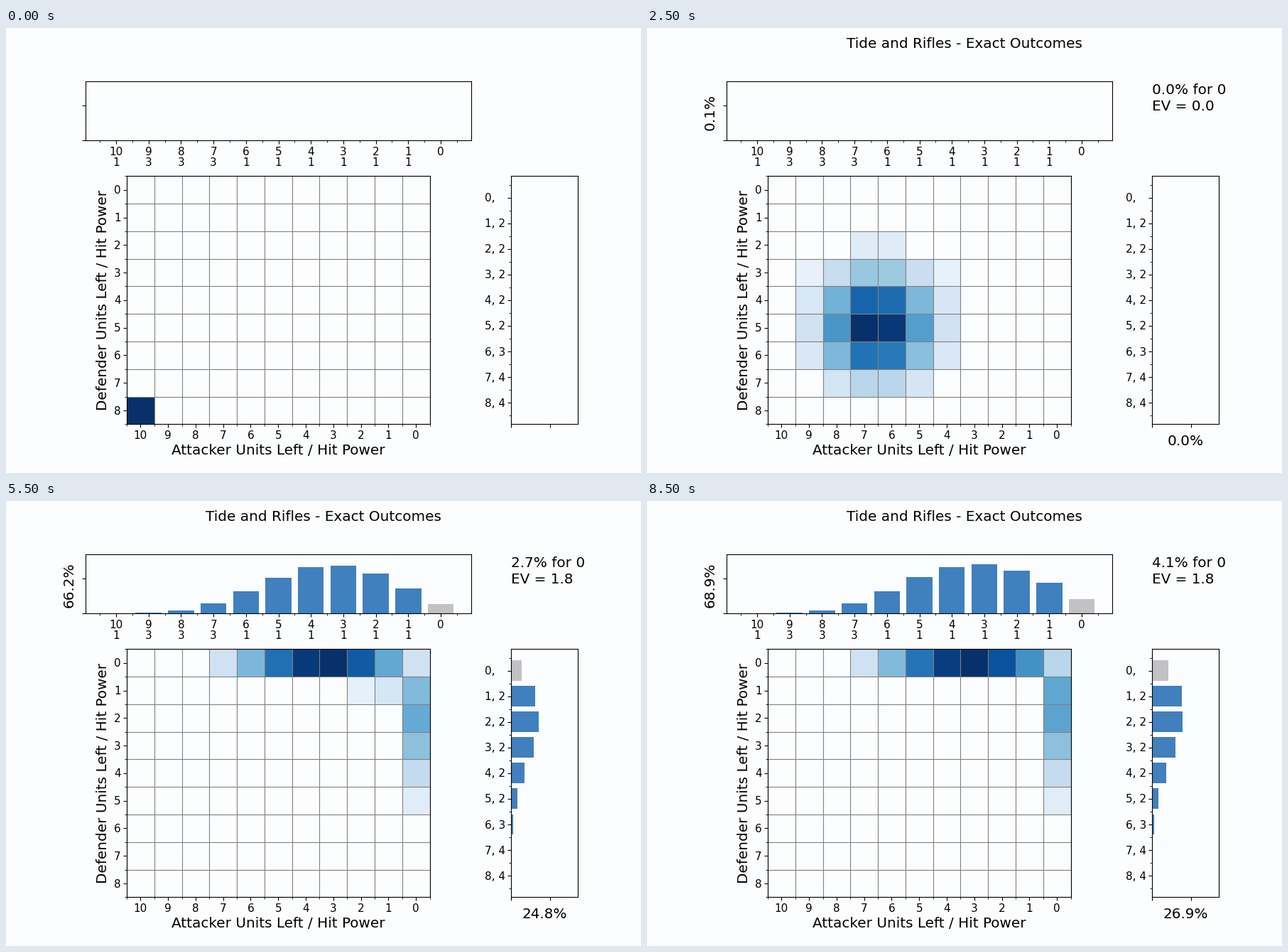
These frames come from a looping animation (894 px wide and 626 px high, 9500 ms). A matplotlib script:

```python
import numpy as np
import matplotlib.pyplot as plt
from matplotlib.animation import FuncAnimation

W, H, DPI = 894, 626, 100
PAPER, BLUE, SILVER = "#fcfdfe", "#4080be", "#c2c2c4"
SMALL, BIG = 11, 14.4
LIMIT = 0.17          # top of both bar scales
FAINT = 0.075         # cells below this share of the peak stay blank

# Hit power (out of 6) of each unit; the weakest units fall first.
ATTACK = [4, 3, 3, 3, 1, 1, 1, 1, 1, 1]
DEFEND = [4, 4, 3, 2, 2, 2, 2, 2]
NA, ND = len(ATTACK), len(DEFEND)
ROUNDS = 7

plt.rcParams["font.family"] = "DejaVu Sans"


def hit_odds(powers):
    odds = np.ones(1)
    for p in powers:
        odds = np.convolve(odds, [1 - p / 6, p / 6])
    return odds


def fight(state):
    """One round of simultaneous fire; state[a, d] holds probabilities."""
    after = np.zeros_like(state)
    after[0], after[:, 0] = state[0], state[:, 0]
    for a in range(1, NA + 1):
        for d in range(1, ND + 1):
            for i, p in enumerate(hit_odds(ATTACK[:a])):
                for j, q in enumerate(hit_odds(DEFEND[:d])):
                    after[max(a - j, 0), max(d - i, 0)] += state[a, d] * p * q
    return after


start = np.zeros((NA + 1, ND + 1))
start[NA, ND] = 1
states = [start]
for _ in range(ROUNDS):
    states.append(fight(states[-1]))

fig = plt.figure(figsize=(W / DPI, H / DPI), dpi=DPI, facecolor=PAPER)


def panel(left, top, right, bottom):
    ax = fig.add_axes([left / W, 1 - bottom / H,
                       (right - left) / W, (bottom - top) / H])
    ax.set_facecolor(PAPER)
    return ax


def write(x, y, s="", size=BIG, ha="center", turn=0):
    """Text with its baseline at pixel (x, y) counted from the top left."""
    return fig.text(x / W, 1 - y / H, s, size=size, ha=ha, va="baseline",
                    rotation=turn, rotation_mode="anchor")


def set_ticks(axis, count):
    axis.set_ticks(range(count), labels=[""] * count)
    axis.set_ticks(np.arange(count + 1) - 0.5, minor=True)


# Heat map of all outcomes
L, T, R, B = 170, 208.4, 596.5, 557.3
grid = panel(L, T, R, B)
mesh = grid.pcolormesh(np.arange(NA + 2) - 0.5, np.arange(ND + 2) - 0.5,
                       np.zeros((ND + 1, NA + 1)), cmap="Blues", vmin=0, vmax=1)
set_ticks(grid.xaxis, NA + 1)
set_ticks(grid.yaxis, ND + 1)
grid.grid(which="minor", color="gray", lw=0.8)
grid.set_xlim(-0.5, NA + 0.5)
grid.set_ylim(ND + 0.5, -0.5)
cell_w, cell_h = (R - L) / (NA + 1), (B - T) / (ND + 1)
for k in range(NA + 1):
    write(L + (k + 0.5) * cell_w, 578, str(NA - k), SMALL)
for k in range(ND + 1):
    write(161.5, T + (k + 0.5) * cell_h + 5.6, str(k), SMALL, "right")
write(383.5, 600, "Attacker Units Left / Hit Power")
write(142, 383, "Defender Units Left / Hit Power", turn=90)

# Attacker bars
top = panel(112, 75, 655, 158)
a_bars = top.bar(range(NA + 1), np.zeros(NA + 1), color=[BLUE] * NA + [SILVER])
set_ticks(top.xaxis, NA + 1)
top.set_yticks([0, 0.1], labels=["", ""])
top.set_xlim(-0.94, NA + 0.94)
top.set_ylim(0, LIMIT)
step = (655 - 112) / (NA + 1.88)
for k in range(NA + 1):
    x, n = 112 + (k + 0.94) * step, NA - k
    write(x, 179, str(n), SMALL)
    if n:
        write(x, 194, str(ATTACK[n - 1 - NA] if n == NA else ATTACK[NA - 1 - k + 0] if False else sorted(ATTACK)[n - 1]), SMALL)

# Defender bars
side = panel(711, T, 805, B)
d_bars = side.barh(range(ND + 1), np.zeros(ND + 1), color=[SILVER] + [BLUE] * ND)
set_ticks(side.yaxis, ND + 1)
side.set_xticks([0, 0.1], labels=["", ""])
side.set_ylim(ND + 0.84, -0.84)
side.set_xlim(0, LIMIT)
step = (B - T) / (ND + 1.68)
for k in range(ND + 1):
    power = sorted(DEFEND)[k - 1] if k else ""
    write(673.5, T + (k + 0.84) * step + 5.6, f"{k}, {power}", SMALL, "left")

title = write(446.5, 28)
a_label = write(95, 118, turn=90)
d_label = write(758, 587)
tie_label = write(711, 93, ha="left")
ev_label = write(711, 116, ha="left")


def draw(i):
    turn = (i - 3) // 2 if i >= 3 else -1
    state = states[max(turn, 0)]
    heat = state[::-1].T / state.max()
    mesh.set_array(np.ma.masked_less(heat, FAINT))

    won, lost, tie = state[1:, 0], state[0, 1:], state[0, 0]
    for bar, p in zip(a_bars, state[::-1, 0]):
        bar.set_height(p)
    for bar, p in zip(d_bars, state[0]):
        bar.set_width(p)

    ev = won @ np.arange(1, NA + 1) - lost @ np.arange(1, ND + 1)
    lines = {
        title: "Tide and Rifles - Exact Outcomes",
        a_label: f"{won.sum():.1%}",
        d_label: f"{lost.sum():.1%}",
        tie_label: f"{tie:.1%} for 0",
        ev_label: f"EV = {ev:.1f}",
    }
    for text, s in lines.items():
        text.set_text(s if turn >= 0 else "")
    return [mesh, *a_bars, *d_bars, *lines]


anim = FuncAnimation(fig, draw, frames=19, interval=500, repeat=True,
                     repeat_delay=0, blit=False)
plt.show()
```
